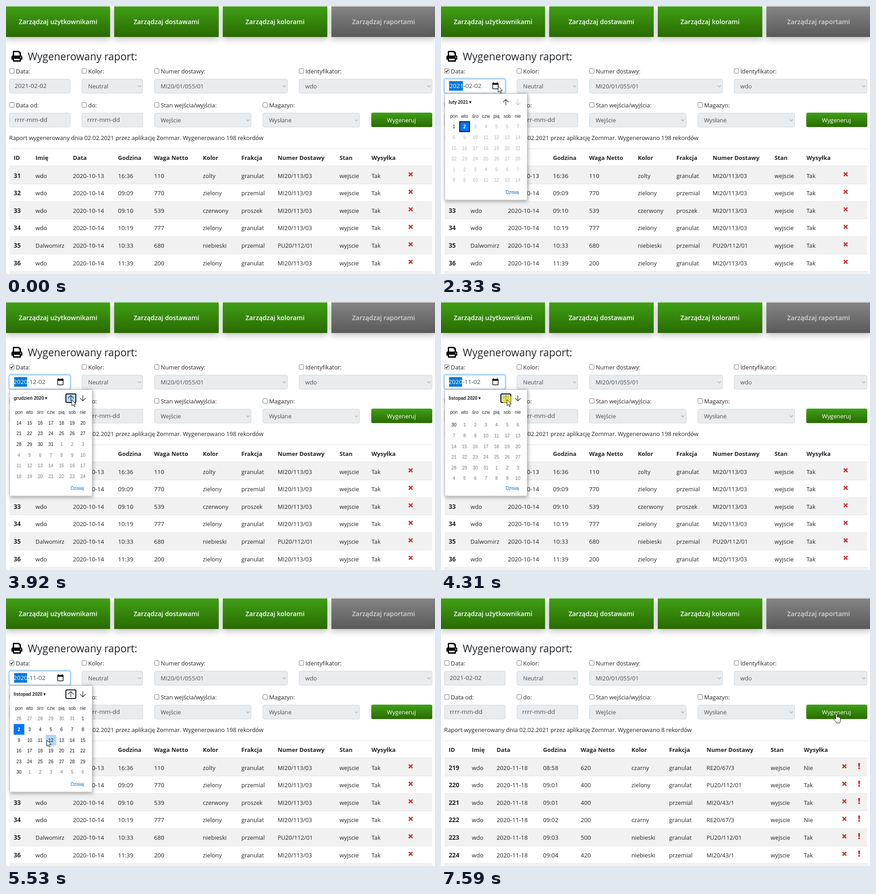
Recreate the animation shown at these times as an HTML page. Size 946x592 px, loop 8000 ms.

```html
<!DOCTYPE html>
<html lang="pl">
<head>
<meta charset="utf-8">
<title>Raport</title>
<style>
html, body { margin: 0; width: 100%; height: 100%; overflow: hidden; background: #fff; }
svg { display: block; width: 100vw; height: 100vh; font: 12.8px "Open Sans", "Noto Sans", sans-serif; fill: #212529; }
text { white-space: pre; }
.num { font-size: 13.2px; }
.id { font-size: 13.6px; font-weight: 700; }
.head { font-weight: 700; }
.title { font-size: 22.8px; font-weight: 500; }
.nav { font-size: 14.25px; font-weight: 600; text-anchor: middle; fill: #fff; }
.off { fill: #d4d4d4; }
.field { fill: #495057; }
.date { font-size: 13.5px; fill: #495057; }
.white { fill: #fff; }
.mid { text-anchor: middle; }
.cal { font: 10px "Liberation Sans", Arial, sans-serif; }
.bold { font-weight: 700; }
.shadow { filter: drop-shadow(0 6px 7px rgba(0,0,0,.22)); }
.popup { filter: drop-shadow(1px 2px 4px rgba(0,0,0,.4)); }
</style>
</head>
<body>
<svg id="stage" viewBox="0 0 946 592" preserveAspectRatio="none"></svg>
<script>
const stage = document.getElementById('stage');
const LOOP = 8000, DAY = 864e5, SWAP = 7560, CHECKED = 1030, OPEN = 1930, CLOSE = 6040;
const COL = 23.5, ROW = 23.65, GRID_X = 16.8, GRID_Y = 254.7;
const HOVER = '#b3d4fc', BLUE = '#0075ff', RED = '#d02f3b';

const text = (x, y, s, cls = '', extra = '') => `<text x="${x}" y="${y}" class="${cls}" ${extra}>${s}</text>`;
const rect = (x, y, w, h, fill, extra = '') => `<rect x="${x}" y="${y}" width="${w}" height="${h}" fill="${fill}" ${extra}/>`;
const line = (d, color, width) => `<path d="${d}" fill="none" stroke="${color}" stroke-width="${width}"/>`;
const ease = u => u * u * (3 - 2 * u);
const progress = (t, a, b) => ease(Math.min(1, Math.max(0, (t - a) / (b - a))));
const latest = (t, list) => list.filter(e => e[0] <= t).pop()[1];

const values = [[0, '2021-02-02'], [2780, '2021-01-02'], [3760, '2020-12-02'],
  [4270, '2020-11-02'], [5960, '2020-11-18'], [SWAP, '2021-02-02']];
const clicks = [920, 1800, 2730, 3730, 4240, 5900, 7370];
// start, end, target x, target y, bend
const moves = [[70, 850, 39, 148, 0], [1200, 1770, 126, 177, 0], [2330, 2730, 145, 216, 0],
  [4250, 4500, 149, 213, 0], [4970, 5750, 76, 338, 0], [6490, 6530, 84, 335, 0], [6530, 7260, 872, 256, -62]];
// start, end, weeks scrolled
const scrolls = [[2760, 3090, -5], [3755, 4085, -4], [4270, 4600, -5]];
const months = { '2021-02': 'luty', '2021-01': 'styczeń', '2020-12': 'grudzień', '2020-11': 'listopad' };

const before = {
  count: 198, cols: [17, 65, 147.5, 247, 326.5, 434, 519, 599, 735.5, 806], cross: 892.3,
  rows: `31|wdo|2020-10-13|16:36|110|zolty|granulat|MI20/113/03|wejscie|Tak
32|wdo|2020-10-14|09:09|770|zielony|przemial|MI20/113/03|wejscie|Tak
33|wdo|2020-10-14|09:10|539|czerwony|proszek|MI20/113/03|wejscie|Tak
34|wdo|2020-10-14|10:19|777|zielony|granulat|MI20/113/03|wyjscie|Tak
35|Dalwomirz|2020-10-14|10:33|680|niebieski|przemial|PU20/112/01|wyjscie|Tak
36|wdo|2020-10-14|11:39|200|zielony|granulat|MI20/113/03|wyjscie|Tak`
};
const after = {
  count: 8, cols: [17, 68, 122.5, 225, 308, 420, 503, 585.5, 727, 800], cross: 889.5, alert: 922,
  rows: `219|wdo|2020-11-18|08:58|620|czarny|granulat|RE20/67/3|wejscie|Nie
220|wdo|2020-11-18|09:01|400|zielony|granulat|PU20/112/01|wejscie|Tak
221|wdo|2020-11-18|09:01|400||przemial|MI20/43/1|wyjscie|Tak
222|wdo|2020-11-18|09:02|200|czarny|granulat|RE20/67/3|wejscie|Nie
223|wdo|2020-11-18|09:03|500|niebieski|granulat|PU20/112/01|wejscie|Tak
224|wdo|2020-11-18|09:04|420|niebieski|przemial|MI20/43/1|wyjscie|Tak`
};
const headings = ['ID', 'Imię', 'Data', 'Godzina', 'Waga Netto', 'Kolor', 'Frakcja', 'Numer Dostawy', 'Stan', 'Wysyłka'];

function table({ count, cols, cross, alert, rows }) {
  let s = text(7, 296.3, `Raport wygenerowany dnia 02.02.2021 przez aplikację Zommar. Wygenerowano ${count} rekordów`);
  s += rect(7.5, 315, 932.5, 1, '#dee2e6') + rect(7.5, 353, 932.5, 1.6, '#dee2e6');
  headings.forEach((h, i) => s += text(cols[i], 340, h, 'head'));
  rows.split('\n').forEach((row, r) => {
    const y = 354.3 + r * 38.66;
    if (r % 2 == 0) s += rect(7.5, y, 932.5, 38.66, '#f1f1f1');
    s += rect(7.5, y + 38.2, 932.5, 1, '#dee2e6');
    row.split('|').forEach((cell, i) =>
      s += text(cols[i], y + 25.2, cell, i == 0 ? 'id' : /^\d/.test(cell) ? 'num' : ''));
    s += line(`M${cross - 4} ${y + 13.5}l8 8m0-8l-8 8`, RED, 2.8);
    if (alert) s += `<path fill="${RED}" d="M${alert - 2.2} ${y + 10.5}h4.4l-.8 8.5h-2.800z"/><circle cx="${alert}" cy="${y + 22}" r="2" fill="${RED}"/>`;
  });
  return s + rect(7.5, 587, 932.5, 5, '#f1f1f1');
}

const checkbox = (x, y, label) =>
  rect(x + .5, y + .5, 10, 10, '#fff', 'rx="1" stroke="#767676"') + text(x + 14.3, y + 10.8, label);
const box = (x, y, w) => rect(x + .5, y + .5, w - 1, 31, '#e9ecef', 'rx="3.5" stroke="#ced4da"');
const select = (x, y, w, s) => box(x, y, w) + text(x + 14, y + 21, s, 'field') +
  line(`M${x + w - 11} ${y + 14.5}l3.5 3.5 3.5-3.5`, '#a5a9ad', 1.1);

const nav = [[0, 229.5, 'użytkownikami'], [238.5, 230.5, 'dostawami'], [478, 230.5, 'kolorami'], [717.5, 230, 'raportami']];
const page = `<defs>
  <linearGradient id="green" x2="0" y2="1"><stop stop-color="#3fa015"/><stop offset="1" stop-color="#2a6a02"/></linearGradient>
  <linearGradient id="grey" x2="0" y2="1"><stop stop-color="#858585"/><stop offset="1" stop-color="#595959"/></linearGradient>
  <clipPath id="days">${rect(GRID_X, GRID_Y - .7, 166, 143, '#000')}</clipPath></defs>` +
  rect(0, 0, 946, 592, '#fff') +
  nav.map(([x, w, s], i) => rect(x, 1, w, 67.5, `url(#${i < 3 ? 'green' : 'grey'})`, 'class="shadow"') +
    text(x + w / 2, 40, 'Zarządzaj ' + s, i < 3 ? 'nav' : 'nav off')).join('') +
  `<path fill="#000" d="M15 109V100.5q0-1.500 1.500-1.500H29l4 4v6q3 .5 3 3.500v6h-3v3q0 1.500-1.500 1.500h-15q-1.500 0-1.500-1.500v-3h-3v-6q0-3 3-3.500z"/>` +
  `<path fill="#fff" d="M18 102h10v3h2v4.500H18zM18 116.500h12v3.500H18z"/><circle cx="32.5" cy="113" r="1.2" fill="#fff"/>` +
  text(48, 120.3, 'Wygenerowany raport:', 'title') +
  checkbox(7.5, 138, 'Data:') + checkbox(167, 138, 'Kolor:') +
  checkbox(327, 138, 'Numer dostawy:') + checkbox(646, 138, 'Identyfikator:') +
  select(167, 161, 135, 'Neutral') + select(327, 161, 294, 'MI20/01/055/01') + select(646, 161, 294, 'wdo') +
  checkbox(7.5, 213, 'Data od:') + checkbox(167, 213, 'do:') +
  checkbox(327, 213, 'Stan wejścia/wyjścia:') + checkbox(566, 213, 'Magazyn:') +
  box(7, 236, 135) + text(19, 256.3, 'rrrr-mm-dd', 'date') +
  box(167, 236, 135) + text(179, 256.3, 'rrrr-mm-dd', 'date') +
  select(327, 236, 214, 'Wejście') + select(566, 236, 214, 'Wysłane') +
  rect(805.5, 235.5, 134.5, 32, 'url(#green)', 'rx="3.5"') + text(872, 256.5, 'Wygeneruj', 'mid white');

function cursorAt(t) {
  let x = 540, y = 567;
  for (const [a, b, tx, ty, bend] of moves) {
    if (t < a) break;
    const u = progress(t, a, b);
    x += (tx - x) * u;
    y += (ty - y) * u + bend * Math.sin(Math.PI * u);
  }
  return { x, y };
}

function dateField(t, value, p) {
  const active = t >= CHECKED && t < SWAP, focused = t >= 1810 && active;
  let s = '';
  if (t >= 920 && t < CHECKED) s += rect(7.5, 138, 11, 11, '#222', 'rx="1"');
  else if (active) s += line('M10 143.500l2.200 2.500 4-5', '#222', 1.6);
  if (p.y < 156 && p.x < 55) s += rect(8, 138.5, 10, 10, 'none', 'rx="1" stroke="#4a4a4a"');
  if (!active) return s + box(7, 161, 135) + text(19, 181.3, value, 'date');
  if (focused) s += rect(6.2, 159.7, 136.6, 33.6, 'none', 'rx="5" stroke="#bfdeff" stroke-width="3"');
  s += rect(7.5, 161.5, 134, 31, '#fff', `rx="3.5" stroke="${focused ? '#80bdff' : '#ced4da'}"`);
  const x = value < '2021' ? 16.5 : 18.5;
  s += text(x, 181.3, value, 'date');
  if (focused) s += rect(18, 166, x + 12, 21, '#0078d7') + text(x, 181.3, value.slice(0, 4), 'date white');
  return s + rect(114, 171, 12, 12, 'none', 'rx="1" stroke="#111" stroke-width="1.5"') +
    rect(113.3, 170, 13.4, 4, '#111') + rect(115, 168.5, 2, 3, '#111') + rect(123, 168.5, 2, 3, '#111');
}

function calendar(t, value, p) {
  const month = value.slice(0, 7), latestMonth = month == '2021-02';
  const scroll = scrolls.reduce((sum, [a, b, weeks]) => sum + weeks * progress(t, a, b), 0);
  let s = rect(8.5, 193.5, 181.5, 235, '#fff', 'class="popup" stroke="#bdbdbd" stroke-width=".8"');
  s += text(17, 215.5, `${months[month]} ${month.slice(0, 4)}`
    + '<tspan dx="2" font-family="DejaVu Sans, sans-serif" font-size="11" font-weight="400">▾</tspan>', 'cal bold');
  const overButton = p.x > 131 && p.x < 155 && p.y > 202 && p.y < 223;
  const pressed = t >= 2760;
  if (overButton || pressed) s += rect(132, 203, 22, 19, overButton ? HOVER : '#fff',
    pressed ? 'rx="2.5" stroke="#101418" stroke-width="2"' : 'rx="2.5"');
  s += line('M143 219v-12.500m-6 6l6-6 6 6', '#1b2733', 1.2);
  s += line('M169.500 206v12.500m-6-6l6 6 6-6', latestMonth ? '#c4c4c4' : '#1b2733', 1.2);
  ['pon', 'wto', 'śro', 'czw', 'pią', 'sob', 'nie'].forEach((d, i) =>
    s += text(28.5 + i * COL, 246.5, d, 'cal mid'));

  s += '<g clip-path="url(#days)">';
  const first = Math.floor(scroll);
  for (let i = 0; i < 49; i++) {
    const col = i % 7, week = first + Math.floor(i / 7);
    const date = new Date(Date.UTC(2021, 1, 1) + (week * 7 + col) * DAY).toISOString().slice(0, 10);
    const x = GRID_X + col * COL, y = GRID_Y + (week - scroll) * ROW;
    const selected = date == value, disabled = date > '2021-02-02';
    const hovered = p.y > GRID_Y && p.x >= x && p.x < x + COL && p.y >= y && p.y < y + ROW;
    if (selected) s += rect(x, y, COL, ROW, BLUE);
    else if (hovered && !disabled) s += rect(x, y, COL, ROW, HOVER);
    if (selected && !pressed) s += rect(x + 1, y + 1, COL - 2, ROW - 2, 'none', 'stroke="#101418" stroke-width="2"');
    const color = selected ? '#fff' : disabled && latestMonth ? '#b2b2b2' : date.startsWith(month) ? '#111' : '#767676';
    s += text(x + COL / 2, y + 15.5, +date.slice(8), selected ? 'cal mid bold' : 'cal mid', `fill="${color}"`);
  }
  return s + '</g>' + text(142.5, 414.5, 'Dzisiaj', 'cal', 'fill="#0a6fc2"');
}

function pointer(t, { x, y }) {
  if (t < 70) return '';
  let s = '';
  if (clicks.some(c => t >= c && t < c + 110)) s += `<circle cx="${x}" cy="${y}" r="11" fill="#f4ee1c" opacity=".68"/>`;
  const overButton = x > 806 && y > 236 && y < 268;
  const overText = t >= CLOSE && y > 325 && y < 346;
  const shape = overButton
    ? 'M-1.500 11V1.500a1.500 1.500 0 0 1 3 0V7q2.400-1 2.800.600 2.300-.800 2.700.900 1.800-.300 1.800 1.600V14q0 3-1.600 6H.200Q-1 17-5.500 12.200-6 9.500-3.500 9.800z'
    : 'M0 0V13.500L3.200 10.600 5.300 15.500 7.500 14.500 5.400 9.700H9.600z';
  s += `<g transform="translate(${x} ${y})">`;
  s += overText
    ? line('M-3-6.500h2.200l.8.800.8-.8H3M0-6V6M-3 6.500h2.200l.8-.8.8.8H3', '#222', 1.1)
    : `<path d="${shape}" fill="#fff" stroke="#111" stroke-width="1" stroke-linejoin="round"/>`;
  return s + '</g>';
}

function draw() {
  const t = performance.now() % LOOP, p = cursorAt(t), value = latest(t, values);
  stage.innerHTML = page + table(t < SWAP ? before : after) + dateField(t, value, p) +
    (t >= OPEN && t < CLOSE ? calendar(t, value, p) : '') + pointer(t, p);
  requestAnimationFrame(draw);
}
draw();
</script>
</body>
</html>
```
